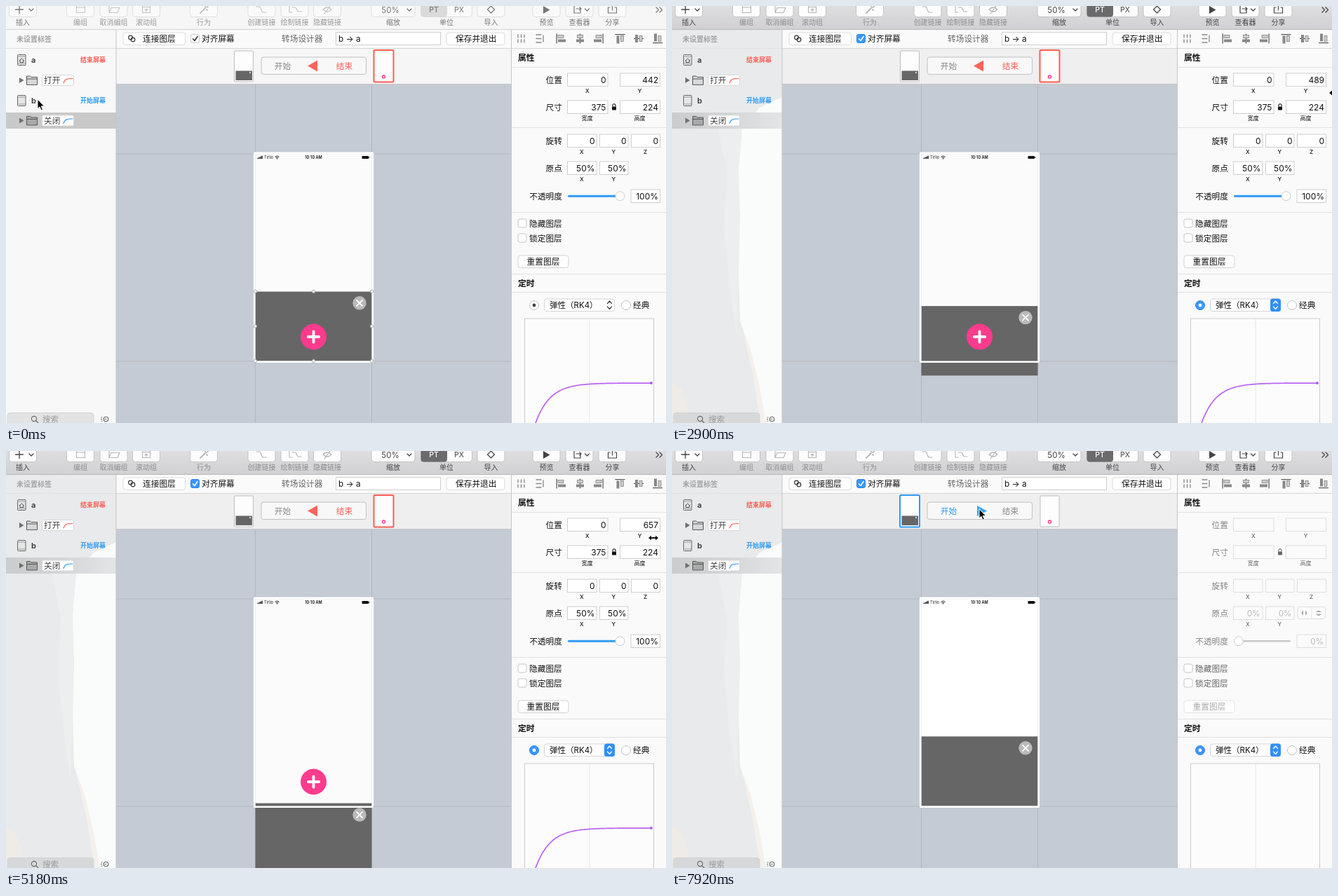
Animation of 941 by 595 pixels, one loop 8 s. Source, as an HTML page:

```html
<!DOCTYPE html>
<html lang="zh">
<head>
<meta charset="utf-8">
<style>
html, body { margin: 0; width: 100%; height: 100%; overflow: hidden; background: #fafafa; }
svg { display: block; width: 941px; height: 595px; font-family: Inter, "Noto Sans CJK SC", "Noto Sans CJK", sans-serif; }
text { white-space: pre; }
</style>
</head>
<body>
<svg id="stage" viewBox="0 0 941 595"></svg>
<script>
const LOOP = 8000;
const RED = '#ff5d52', BLUE = '#2f9bf5', PINK = '#ff3b8d', DARK = '#666', INK = '#111';

// Bursts of change: start, end, number of steps
const bursts = [[150, 980, 6], [1420, 2450, 8], [2600, 3520, 7], [3670, 4640, 7],
  [4820, 5840, 7], [6140, 7180, 8], [7320, 7920, 5]];
// step, value of the Y field
const yKeys = [[14, 442], [17, 489], [19, 523], [21, 523], [23, 562], [25, 600], [28, 600], [31, 657], [33, 682]];
// step, pointer x, pointer y
const pointerKeys = [[0, 45, 133.5], [3, 50, 158], [6, 50, 158], [7, 46, 161], [8, 120, 160], [12, 870, 124],
  [14, 916, 124], [17, 944, 124], [19, 962, 124], [21, 885, 124], [23, 911, 124], [25, 940, 124],
  [28, 890, 124], [31, 923, 124], [33, 931, 124], [35, 931, 124], [36, 926, 122], [41, 320, 80],
  [43, 336, 86], [45, 338, 86], [48, 438, 83]];

function stepAt(t) {
  let base = 0, step = 0;
  for (const [start, end, n] of bursts) {
    if (t >= start) step = base + 1 + Math.min(n - 1, Math.floor((t - start + 15) / ((end - start) / (n - 1))));
    base += n;
  }
  return step;
}

function tween(keys, k) {
  if (k <= keys[0][0]) return keys[0].slice(1);
  for (let i = 1; i < keys.length; i++) {
    const a = keys[i - 1], b = keys[i];
    if (k <= b[0]) return a.slice(1).map((v, j) => v + (b[j + 1] - v) * (k - a[0]) / (b[0] - a[0]));
  }
  return keys[keys.length - 1].slice(1);
}

// Drawing helpers; text y is the vertical middle
const text = (x, y, s, size = 11.7, fill = INK, anchor = 'start', weight = 400) =>
  `<text x="${x}" y="${y + size * .37}" font-size="${size}" fill="${fill}" text-anchor="${anchor}" font-weight="${weight}">${s}</text>`;
const rect = (x, y, w, h, fill, stroke = 'none', r = 0, sw = 1) =>
  `<rect x="${x}" y="${y}" width="${w}" height="${h}" rx="${r}" fill="${fill}" stroke="${stroke}" stroke-width="${sw}"/>`;
const path = (d, stroke, sw = 1, fill = 'none') =>
  `<path d="${d}" fill="${fill}" stroke="${stroke}" stroke-width="${sw}" stroke-linecap="round" stroke-linejoin="round"/>`;
const fillPath = (d, fill) => `<path d="${d}" fill="${fill}"/>`;
const circle = (x, y, r, fill, stroke = 'none', sw = 1) =>
  `<circle cx="${x}" cy="${y}" r="${r}" fill="${fill}" stroke="${stroke}" stroke-width="${sw}"/>`;
const hLine = (x, y, w, fill = '#dcdcdc') => rect(x, y, w, 1, fill);
const at = (x, y, s) => `<g transform="translate(${x} ${y})">${s}</g>`;

function toolbar(active) {
  const on = active ? '#444' : '#777', off = active ? '#8d8d8d' : '#999', faint = active ? '#b5b5b5' : '#c4c4c4';
  const edge = active ? '#c3c2c4' : '#dedede';
  let s = rect(0, 0, 941, 33, active ? 'url(#bar)' : '#f6f6f6') + hLine(0, 33, 941, active ? '#b9b9b9' : '#d2d2d2');
  const items = [['插入', 24, 1], ['编组', 106], ['取消编组', 153.5], ['滚动组', 200], ['行为', 282], ['创建链接', 364.5],
    ['绘制链接', 411.5], ['隐藏链接', 458], ['缩放', 552, 1], ['单位', 628, 1], ['导入', 691.5, 1], ['预览', 770.5, 1],
    ['查看器', 817.5, 1], ['分享', 864.5, 1]];
  for (const [name, x, enabled] of items) {
    const half = name === '缩放' ? 31 : name === '单位' ? 36.5 : 19.5;
    s += rect(x - half, -8, half * 2, 23.5, active ? '#fdfdfd' : '#fafafa', edge, 4);
    s += text(x, 23, name, 10, enabled ? on : off, 'middle', 500);
  }
  s += rect(591.5, -8, 37.5, 23.5, active ? '#6b6a6c' : '#dadada', 'none', 4);
  s += text(610, 5.5, 'PT', 10.5, active ? '#fff' : '#777', 'middle', 500);
  s += text(646, 5.5, 'PX', 10.5, on, 'middle') + text(548, 5.5, '50%', 11.5, on, 'middle');
  s += path('M13.5 5h11M19 -1v11.5', on, 1.3);
  for (const x of [36, 575, 828.5]) s += path(`M${x - 3} 4l3 3 3-3`, on, 1.3);
  s += path('M100.5 -2h12v11.5h-12zM100.5 2h12M147-2v11.5h12l3-7h-12l-3 7M194.5 -2h11v11.5h-11zM194.5 1.5h11M200 4v4M198 6l2-2 2 2', faint, 1.1);
  s += path('M277 10l7-7M284-1v2M288 1l-2 1M287 6l-1-1', faint, 1.8);
  s += path('M357 1h4c4 0 2 8 6 8h4M404-2v11h4M408 2h4c3 0 2 6 5 6h4', faint, 1.1);
  s += path('M452 5q6-6 12 0q-6 6-12 0M454 11l8-11', faint, 1.2);
  s += path('M691.5 0l5 5-5 5-5-5z', on, 1.2) + fillPath('M766 0v11l9.5-5.5z', on);
  s += path('M812-2h-2v12h9v-4M813 4h7m-2-2l2 2-2 2M861 2h-2.5v8h12V2H868M864.5 6v-8', on, 1.2);
  return s + path('M927 2l3.5 3.5-3.5 3.5M932 2l3.5 3.5-3.5 3.5', on, 1.3);
}

function sidebar(active, hover) {
  let s = rect(0, 34, 157, 561, active ? '#e8eaec' : '#f8f8f8');
  if (active) {
    s += fillPath('M66 175L78 240 74 320 82 400 92 470 100 175Z', '#eceef0');
    s += fillPath('M98 450L106 485 116 530 126 595H157V450Z', '#f4f0ec');
    s += fillPath('M100 175L95 235 97 300 95 380 97 450 112 490 124 540 134 595H157V130L125 145Z', '#fafbfb');
    s += fillPath('M0 536L14 545 22 565 25 595H0Z', '#efebe7');
  }
  s += text(15, 47, '未设置标签', 10, '#a2a2a2', 'start', 600) + hLine(0, 60, 157, '#e0e0e0');
  s += rect(0, 152, 157, 23, active ? 'url(#row)' : '#c9c9c9');

  const device = y => rect(16.5, y - 7.5, 11.5, 15, '#e6e6e6', '#666', 1) + path(`M16.5 ${y - 5}h11.5M16.5 ${y + 5}h11.5`, '#888', .8);
  const folder = (y, color) => {
    const fill = y > 150 ? '#aaa' : '#d9d9d9';
    return fillPath(`M19 ${y - 4}v8l6.5-4z`, '#707070') +
      path(`M29.5 ${y + 6}v-12h5l1.5 1.5h8.5v10.5zM29.5 ${y - 2}h15`, '#555', 1, fill) +
      rect(51.5, y - 7.5, 45, 15, '#fdfdfd', '#d8d8d8', 2) +
      path(`M82 ${y + 4}C84 ${y - 2} 87 ${y - 2.5} 95 ${y - 2.5}`, color, 1.1);
  };
  s += device(77) + path('M19 78l3.3-3 3.3 3M20 77.5v3h4.6v-3', '#555') + device(135);
  s += text(36, 77, 'a', 11, '#333', 'start', 600) + text(36, 135, 'b', 11, '#333', 'start', 600);
  s += text(142, 77, '结束屏幕', 9, RED, 'end', 700) + text(142, 135, '开始屏幕', 9, BLUE, 'end', 700);
  s += folder(106, RED) + text(54, 106, '打开', 11.7, '#444') + folder(163.5, BLUE) + text(54, 163.5, '关闭', 11.7, '#444');
  if (hover) s += rect(148, 157.5, 5, 4, '#a5a5a5') + path('M149 157v-1.5q1.5-2 3 0v1.5M147 169q3.5-4 7 0q-3.5 3-7 0M148 172l5-6', '#a5a5a5', .9);

  s += rect(2, 580.5, 123, 22, active ? '#d7d8d9' : '#e3e3e3', '#d3d3d3', 4);
  s += circle(40, 589, 3.6, 'none', '#666', 1.1) + path('M43 592l3 3', '#666', 1.2) + text(52, 590, '搜索', 11.5, '#9c9c9c');
  s += circle(142.5, 589.5, 3.3, 'none', '#666', 1.1) + path('M136 587h1M135.5 589.5h1M136 592h1M141 589.5h2', '#666', 1.2);
  return s + rect(156.5, 34, 1, 561, '#c6c6c6');
}

function tick(x, y, active, checked) {
  return rect(x, y, 12, 12, active && checked ? '#3a97fb' : '#fff', active && checked ? '#2b86ec' : '#c6c6c6', 2.5) +
    (checked ? path(`M${x + 3} ${y + 6.5}l2.5 2.5 4-6`, active ? '#fff' : '#333', 1.6) : '');
}

function header(active, start) {
  const label = (x, s, fill = INK) => text(x, 46.5, s, 11.7, fill, 'start', 500);
  let s = rect(157, 34, 564, 27, '#fafafa') + hLine(157, 60, 564, '#d6d6d6');
  s += rect(167, 38, 88.5, 17.5, '#fff', '#dcdcdc', 3.5) + rect(628, 38, 83, 17.5, '#fff', '#dcdcdc', 3.5);
  s += circle(177.5, 45, 2.8, 'none', '#333', 1.2) + circle(181, 48, 2.8, 'none', '#333', 1.2);
  s += label(195, '连接图层') + tick(263.5, 40.5, active, true) + label(279, '对齐屏幕') + label(393, '转场设计器', '#666');
  s += rect(470.5, 37.5, 149, 18, '#fff', '#cfcfcf') + text(474, 46.5, 'b → a') + label(641, '保存并退出');

  s += rect(157, 61, 564, 50, active ? '#efefef' : '#f6f6f6') + hLine(157, 111, 564, '#c4c6c9');
  const thumb = (x, chosen, color) => chosen ? rect(x - .5, 63, 28, 45.5, '#fdfdfd', color, 1.5, 2) : rect(x, 64, 27, 44, '#fdfdfd', '#bdbdbd', 1);
  s += thumb(325.5, start, BLUE) + rect(327.5, 92.5, 23.5, 13.5, DARK) + circle(348, 95, 1.2, '#ccc');
  s += thumb(525, !start, RED) + circle(538.5, 101, 2, '#fff', PINK, 1.5);
  s += rect(364, 73, 149.5, 24.5, '#f8f8f8', '#c1c1c1', 3);
  s += text(394.5, 85.5, '开始', 11.7, start ? BLUE : '#888', 'middle') + text(482.5, 85.5, '结束', 11.7, start ? '#888' : RED, 'middle');
  return s + (start ? fillPath('M435 78V93L449 85.5Z', '#39a5f4') : fillPath('M430 85.5L444 77.5V93.5Z', '#ff6459'));
}

function canvas(y, start, selected) {
  const top = 407.3 + (y - 442) * .443, bottom = top + 99.2;
  let s = rect(157, 112, 564, 483, '#c5cbd4');
  for (const x of [355, 521]) s += rect(x, 112, 1, 483, '#b3b8c1');
  for (const g of [210.5, 506.5]) s += hLine(157, g, 564, '#b3b8c1');
  s += rect(355.5, 211.2, 166, 295.3, start ? '#fff' : '#fbfbfb') + rect(355.5, top, 166, 99.2, DARK);
  s += rect(354.2, 209.9, 168.6, 297.9, 'none', '#fff', .5, 2.6);
  for (let i = 0; i < 4; i++) s += rect(358.3 + i * 2, 217 - i - .3, 1.5, 1.3 + i, '#222');
  s += text(368, 216, 'Tirlio', 5.6, '#222') + text(438.5, 216, '10:10 AM', 5.6, '#111', 'middle', 600);
  s += path('M383.8 215q2.7-2.2 5.4 0M385 216.6q1.5-1.2 3 0', '#222', 1) + circle(386.5, 218, .7, '#222');
  s += rect(507.5, 214, 9.5, 4, '#111', 'none', .8) + rect(517.5, 215, .8, 2, '#111');
  if (!start) s += circle(438.5, 472, 18.5, PINK) + path('M430.8 472h15.4M438.5 464.3v15.4', '#fff', 3.8);
  s += at(504, top + 16.5, circle(0, 0, 9.7, '#bababa') + path('M-4-4L4 4M4-4L-4 4', '#fff', 1.8));
  if (selected) {
    s += rect(355.5, top, 166, 99.2, 'none', '#c9c9c9', 0, .7);
    const mid = (top + bottom) / 2;
    for (const x of [355.5, 438.5, 521.5]) for (const h of [top, mid, bottom])
      if (x !== 438.5 || h !== mid) s += circle(x, h, 2.2, '#fff', '#9a9a9a', .8);
  }
  return s;
}

function alignIcons() {
  let s = path('M730 41v4M734.5 41v4M739 41v4M730 48v4M734.5 48v4M739 48v4M756 41h7M756 46.5h7M756 52h7M766 42v9', '#888', 1.3);
  const bars = (x, edge, a, b) => at(x, 46.5, rect(edge, -7, 1.2, 14, '#555') + rect(a, -5, 8, 4, '#ccc', '#777', 0, .7) + rect(b, 1, 11, 4, '#888'));
  s += bars(791, -6.5, -4, -4) + bars(818.5, -.6, -4, -5.5) + bars(845, 5.5, -4, -7);
  const cols = (x, edge, a, b) => at(x, 46.5, rect(-7, edge, 14, 1.2, '#555') + rect(-5, a, 4, 11, '#888') + rect(1, b, 4, 8, '#ccc', '#777', 0, .7));
  return s + cols(875.5, -6.5, -4, -4) + cols(902, -.6, -5.5, -4) + cols(929, 5.5, -7, -4);
}

function inspector(active, start, y) {
  const ink = start ? '#858585' : INK, small = start ? '#666' : INK, option = start ? '#666' : INK;
  let s = rect(721, 34, 220, 561, '#fafafa') + rect(720, 34, 1, 561, '#c6c6c6') + alignIcons();
  for (const [ly, c] of [[60, '#d6d6d6'], [87], [173], [294], [382], [408]]) s += hLine(721, ly, 220, c || '#e2e2e2');
  const field = (x, cy, w, value, label, dim) =>
    rect(x + .5, cy - 9.5, w, 18.5, start ? '#fbfbfb' : '#fff', start ? '#dedede' : '#cfcfcf') +
    (start ? dim ? text(x + w - 3, cy + .5, dim, 11.7, '#bbb', 'end') : '' : text(x + w - 2, cy + .5, value, 12, INK, 'end')) +
    (label ? text(x + w / 2, cy + 15.5, label, 8, small, 'middle', 500) : '');
  const name = (cy, s) => text(793, cy, s, 11.7, ink, 'end', 500);
  const label = (x, cy, s, fill = option, anchor) => text(x, cy, s, 11.7, fill, anchor, 500);

  s += text(730, 73.5, '属性', 11.8, INK, 'start', 600);
  s += name(105.5, '位置') + field(800, 105.5, 57.5, 0, 'X') + field(875, 105.5, 57, Math.round(y), 'Y');
  s += name(144.5, '尺寸') + field(800, 144.5, 57.5, 375, '宽度') + field(875, 144.5, 57, 224, '高度');
  s += rect(864, 143.5, 6, 5, small, 'none', .8) + path('M865 143v-2q2-2.5 4 0v2', small, 1.1);
  s += name(192.5, '旋转') + field(800, 192.5, 41.5, 0, 'X') + field(846, 192.5, 40.5, 0, 'Y') + field(891, 192.5, 41, 0, 'Z');
  s += name(231.5, '原点') + field(800, 231.5, 41.5, '50%', 'X', '0%') + field(846, 231.5, 40.5, '50%', 'Y', '0%');
  if (start) s += rect(892, 222.5, 39.5, 17, '#fcfcfc', '#dedede', 3.5) + rect(911.5, 222.5, 1, 17, '#e4e4e4') +
    fillPath('M900 227.5v7q-5-3.5 0-7M903 227.5v7q5-3.5 0-7M918 230h8q-4-5-8 0M918 232.5h8q-4 5-8 0', '#aaa');

  s += name(271.5, '不透明度') + rect(802, 270, 80, 2.5, start ? '#c9c9c9' : '#d5d5d5', 'none', 1.2);
  if (!start) s += rect(801, 269.8, 70, 3, BLUE, 'none', 1.5);
  s += circle(start ? 808 : 875.5, 271.2, 6.5, '#fff', '#cdcdcd') + field(890.5, 271.5, 41.5, '100%', '', '0%');
  s += tick(730, 304, active, false) + label(746, 310.5, '隐藏图层');
  s += tick(730, 325, active, false) + label(746, 331.5, '锁定图层');
  s += rect(730, 356, 72, 17.5, '#fff', start ? '#e4e4e4' : '#d2d2d2', 3.5) + label(766, 364.5, '重置图层', start ? '#aaa' : INK, 'middle');

  s += text(730, 396, '定时', 11.8, INK, 'start', 600);
  s += circle(753, 427, 6.5, active ? '#3a97fb' : '#fff', active ? '#2b86ec' : '#c3c3c3') + circle(753, 427, 2.4, active ? '#fff' : '#444');
  s += rect(767.5, 418, 100, 17.5, '#fff', '#d5d5d5', 3.5);
  if (active) s += rect(853, 417.5, 15, 18.5, '#2f8ffa', 'none', 3.5);
  s += text(775, 427, '弹性（RK4）', 11.5);
  s += path('M857.5 424.5l3-3.5 3 3.5M857.5 429l3 3.5 3-3.5', active ? '#fff' : '#444', 1.3);
  s += circle(884, 427, 6.5, '#fff', '#c3c3c3') + label(894, 427, '经典', INK);
  s += rect(739.5, 446, 184, 160, '#fcfcfc', '#cbcbcb') + rect(831.5, 446, 1, 150, '#e6e6e6');
  if (!start) {
    let d = 'M';
    for (let x = 753; x <= 920; x += 2) d += `${x} ${(538 + 57 * Math.exp((755 - x) / 21)).toFixed(2)} `;
    s += path(d, '#ba63f2', 1.7) + circle(920, 538, 1.9, '#a95be0');
  }
  return s;
}

function pointer(x, y, scrub) {
  const arrows = 'M-7 0L-3-3.5V-1H3V-3.5L7 0 3 3.5V1H-3V3.5Z';
  return at(x, y, scrub
    ? path(arrows, '#fff', 1.6) + fillPath(arrows, '#111')
    : path('M0 0V13L3 10.3 5.2 15.3 7.4 14.3 5.2 9.5H9.3Z', '#fff', 1, '#000'));
}

const defs = `<defs>
<linearGradient id="bar" x2="0" y2="1"><stop stop-color="#dedddf"/><stop offset="1" stop-color="#d1d0d2"/></linearGradient>
<linearGradient id="row"><stop stop-color="#cbcccd"/><stop offset=".5" stop-color="#d3d5d6"/><stop offset="1" stop-color="#e3e5e6"/></linearGradient>
</defs>`;

function scene(k) {
  const active = k >= 3, start = k >= 45, hover = k >= 3 && k <= 8;
  const scrub = k >= 13 && k <= 35, selected = !start && (k < 15 || k >= 36);
  const y = start ? 442 : tween(yKeys, k)[0];
  const [px, py] = tween(pointerKeys, k);
  return defs + canvas(y, start, selected) + header(active, start) + sidebar(active, hover) +
    inspector(active, start, y) + toolbar(active) + pointer(px, py, scrub);
}

const stage = document.getElementById('stage');
const began = performance.now();
let shown = -1;
function frame() {
  const k = stepAt((performance.now() - began) % LOOP);
  if (k !== shown) stage.innerHTML = scene(shown = k);
  requestAnimationFrame(frame);
}
frame();
</script>
</body>
</html>
```
